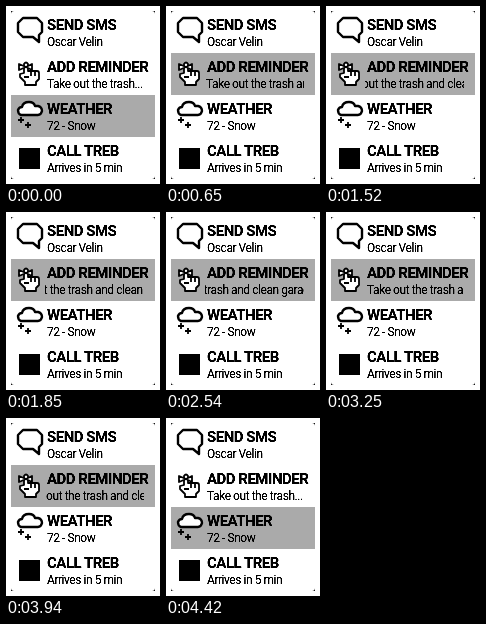
Animation of 154x178 px, one loop 6.52 s. Source, as an HTML page:

```html
<!DOCTYPE html>
<html lang="en">
<head>
<meta charset="utf-8">
<title>Watch menu</title>
<style>
  html, body { margin: 0; width: 100%; height: 100%; overflow: hidden; background: #fff; }
  svg { display: block; width: 154px; height: 178px; }

  text { font-family: Roboto, "Liberation Sans", sans-serif; fill: #000; }
  .title { font-size: 15px; font-weight: 700; letter-spacing: -.5px; }
  .sub { font-size: 12px; letter-spacing: -.45px; }
  .icon { fill: #fff; stroke: #000; stroke-width: 2.4; stroke-linejoin: round; }
  .thin { stroke-width: 1.8; }

  .bar, .short, .long, .run { animation: 6520ms linear infinite; }
  .bar { animation-name: select; }
  .short { animation-name: short; }
  .long { animation-name: long; }
  .run { animation-name: run; }

  /* highlight: down row -> up row at 530 ms, back at 4330 ms */
  @keyframes select {
    0% { transform: translateY(42px); }
    8.129% { transform: translateY(42px); animation-timing-function: steps(4, start); }
    9.969% { transform: translateY(0); }
    66.411% { transform: translateY(0); animation-timing-function: steps(4, start); }
    68.252%, 100% { transform: translateY(42px); }
  }
  @keyframes short {
    0% { opacity: 1; animation-timing-function: step-end; }
    8.129% { opacity: 0; animation-timing-function: step-end; }
    66.411%, 100% { opacity: 1; }
  }
  @keyframes long {
    0% { opacity: 0; animation-timing-function: step-end; }
    8.129% { opacity: 1; animation-timing-function: step-end; }
    66.411%, 100% { opacity: 0; }
  }
  /* marquee: run to the end, hold, then start over */
  @keyframes run {
    0% { transform: translateX(0); }
    9.509% { transform: translateX(0); animation-timing-function: steps(75); }
    42.638% { transform: translateX(-75px); animation-timing-function: step-end; }
    49.847% { transform: translateX(0); animation-timing-function: steps(43); }
    66.411% { transform: translateX(-43px); animation-timing-function: step-end; }
    100% { transform: translateX(0); }
  }
</style>
</head>
<body>
<svg viewBox="0 0 154 178" xmlns="http://www.w3.org/2000/svg">
  <defs>
    <clipPath id="screen"><rect x="5" y="5" width="144" height="168" rx="3"/></clipPath>
    <clipPath id="line"><rect x="39" y="70" width="99" height="18"/></clipPath>
    <filter id="crisp" filterUnits="userSpaceOnUse" x="0" y="0" width="154" height="178">
      <feComponentTransfer><feFuncA type="linear" slope="2.2" intercept="-.4"/></feComponentTransfer>
    </filter>
  </defs>

  <rect x="5" y="5" width="144" height="168"/>
  <g clip-path="url(#screen)">
    <rect x="5" y="5" width="144" height="168" fill="#fff"/>
    <rect class="bar" x="5" y="47" width="144" height="42" fill="#aaa"/>

    <!-- speech bubble -->
    <path class="icon" d="M17 12H31L36 17V26L33 29V36L27 31H17L12 26V17Z"/>

    <!-- hand with a string on the finger -->
    <g class="icon thin">
      <path d="M18 67V58Q20 55 22 58V65H31Q33 65 33 67V73L30 76V79H19V76L14 71V68Z"/>
      <path d="M25 65V70M29 65V70M18 71H23" fill="none"/>
      <path d="M20 61L13 58V64ZM20 61L26 58V64Z"/>
    </g>

    <!-- cloud and flakes -->
    <path class="icon" d="M15 109Q12 108 12 104Q13 101 16 101Q17 96 23 96Q28 96 29 100H32Q36 101 36 105Q35 109 32 109Z"/>
    <path class="icon thin" d="M12 114H18M15 111V117M19 119H25M22 116V122"/>

    <rect x="13" y="142" width="21" height="21"/>

    <g filter="url(#crisp)">
      <g class="title">
        <text x="41" y="24">SEND SMS</text>
        <text x="41" y="66">ADD REMINDER</text>
        <text x="41" y="108">WEATHER</text>
        <text x="41" y="150">CALL TREB</text>
      </g>
      <g class="sub">
        <text x="41" y="40">Oscar Velin</text>
        <text class="short" x="41" y="82">Take out the trash...</text>
        <g clip-path="url(#line)">
          <g class="long"><text class="run" x="41" y="82">Take out the trash and clean garage</text></g>
        </g>
        <text x="41" y="124">72 - Snow</text>
        <text x="41" y="166">Arrives in 5 min</text>
      </g>
    </g>
  </g>
</svg>
</body>
</html>
```
